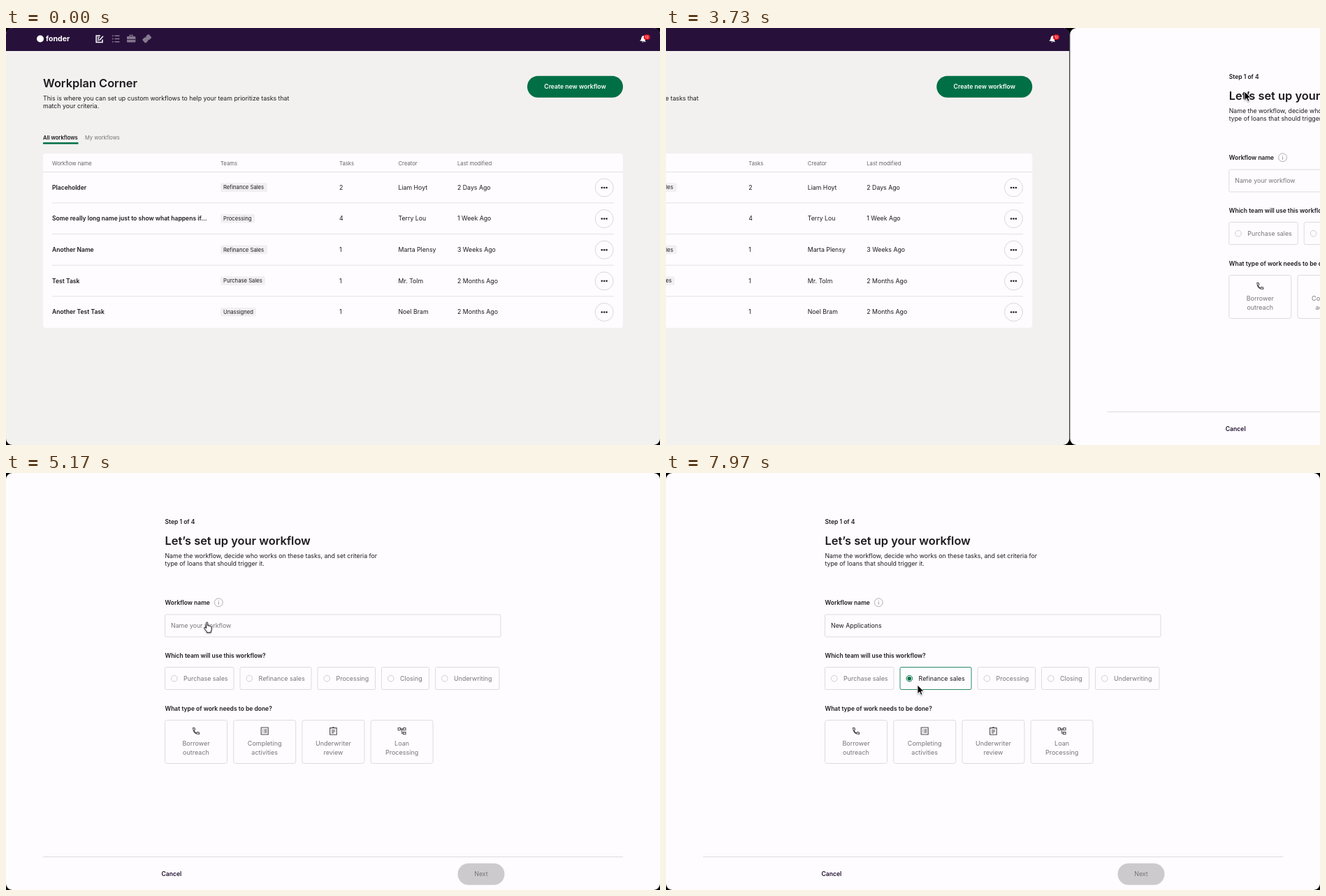
These frames come from a looping animation (936 px wide and 598 px high, 8 s). An HTML page:

```html
<!DOCTYPE html>
<html lang="en">
<head>
<meta charset="utf-8">
<title>Workflow setup</title>
<style>
html, body { margin: 0; width: 100%; height: 100%; overflow: hidden; background: #000; }
svg { display: block; font-family: Inter, "Open Sans", sans-serif; }
</style>
</head>
<body>
<svg id="stage" width="936" height="598" viewBox="0 0 936 598"></svg>
<script>
const INK = '#1c1a1f', GREY = '#757477', LINE = '#dcdbde', GREEN = '#006f46', PAPER = '#fefcff';

// y is the middle of the capital letters
const text = (x, y, s, size = 8.75, weight = 400, fill = INK, anchor = 'start', extra = '') =>
  `<text x="${x}" y="${y + size * 0.364}" font-size="${size}" font-weight="${weight}" fill="${fill}" text-anchor="${anchor}" ${extra}>${s}</text>`;
const rect = (x, y, w, h, r, fill, stroke = 'none', extra = '') =>
  `<rect x="${x}" y="${y}" width="${w}" height="${h}" rx="${r}" fill="${fill}" stroke="${stroke}" ${extra}/>`;
const circle = (x, y, r, fill, stroke = 'none', extra = '') =>
  `<circle cx="${x}" cy="${y}" r="${r}" fill="${fill}" stroke="${stroke}" ${extra}/>`;
const hline = (x1, x2, y, stroke = LINE) => `<path d="M${x1} ${y}H${x2}" stroke="${stroke}"/>`;
const icon = (cx, cy, d, color, width = 1.1) =>
  `<path transform="translate(${cx - 6} ${cy - 6})" d="${d}" fill="none" stroke="${color}" stroke-width="${width}"/>`;

function navBar() {
  const dim = '#85788f';
  return '<path d="M0 33V9Q0 0 9 0H927Q936 0 936 9V33Z" fill="#27113b"/>' +
    circle(49, 15.5, 5, '#fff') + text(57, 15.5, 'fonder', 10.6, 700, '#fff') +
    icon(134, 15.5, 'M7 1.5H1.2V11H10V7M3 4H6M3 6.3H5M3 8.6H4.5M5.5 8.3L11 2.2', '#fff', 1.5) +
    icon(157, 15.5, 'M1 1.8H2.8M1 6H2.8M1 10.2H2.8M4.5 1.8H11.5M4.5 6H11.5M4.5 10.2H11.5', dim, 1.5) +
    rect(173, 12, 12.4, 8.6, 1, dim) + icon(179.2, 15.5, 'M4 2.5V.9H8V2.5', dim, 1.2) + hline(173, 185.4, 16.6, '#27113b') +
    `<g transform="rotate(-42 201.7 15.3)">${rect(195.6, 11.8, 12.2, 7, 1, dim)}${circle(201.7, 11.8, 1, '#27113b')}${circle(201.7, 18.8, 1, '#27113b')}</g>` +
    '<path transform="rotate(12 912 16)" d="M907.5 19.2L909 17.5V14.5Q909 11 912 11T915 14.5V17.5L916.5 19.2ZM910.8 20H913.2Q912 21.8 910.8 20Z" fill="#fff"/>' +
    rect(912.6, 9.2, 9.2, 7.8, 3.9, '#e3121f') + text(917.2, 13.1, '12', 5, 500, '#fff', 'middle');
}

function tableRow([name, team, tagWidth, tasks, who, when], i) {
  const y = 228.6 + 44.65 * i;
  return text(66, y, name, 8.55, 600) +
    rect(307, y - 6.3, tagWidth, 12.6, 2, '#f1eff1') + text(311, y, team, 7.7) +
    text(477, y, tasks) + text(561.5, y, who) + text(646, y, when) +
    circle(856.2, y + 0.3, 13, PAPER, '#d9d7dc') +
    [-3.4, 0, 3.4].map(d => circle(856.2 + d, y + 0.3, 1.25, INK)).join('') +
    (i < 4 ? hline(66, 870, y + 22.3, '#e3e1e5') : '');
}

const rows = [
  ['Placeholder', 'Refinance Sales', 67, 2, 'Liam Hoyt', '2 Days Ago'],
  ['Some really long name just to show what happens if...', 'Processing', 49, 4, 'Terry Lou', '1 Week Ago'],
  ['Another Name', 'Refinance Sales', 67, 1, 'Marta Plensy', '3 Weeks Ago'],
  ['Test Task', 'Purchase Sales', 64, 1, 'Mr. Tolm', '2 Months Ago'],
  ['Another Test Task', 'Unassigned', 51, 1, 'Noel Bram', '2 Months Ago']
];
const heads = [[66, 'Workflow name'], [307, 'Teams'], [477, 'Tasks'], [561.5, 'Creator'], [646, 'Last modified']];

const listPage = rect(0, 0, 936, 598, 9, '#f2f1ef') + navBar() +
  text(53, 79, 'Workplan Corner', 16.4, 600) +
  text(53, 100.7, 'This is where you can set up custom workflows to help your team prioritize tasks that') +
  text(53, 112, 'match your criteria.') +
  rect(746, 68.8, 137, 31, 15.5, GREEN) + text(814.5, 84.2, 'Create new workflow', 8.65, 600, '#fff', 'middle') +
  text(53, 157.5, 'All workflows', 7.6, 600) + text(113, 157.5, 'My workflows', 7.5, 400, GREY) +
  rect(53, 164, 50.5, 2.4, 0.5, GREEN) +
  rect(53, 180, 830, 250, 4, PAPER) + hline(53, 883, 206.5, '#e3e1e5') +
  heads.map(([x, s]) => text(x, 193.8, s, 7.7, 400, '#656368')).join('') +
  rows.map(tableRow).join('');

const chips = [[227.5, 98.5, 'Purchase sales'], [335, 102, 'Refinance sales'], [446, 82.5, 'Processing'],
  [537.5, 68, 'Closing'], [614.5, 91.5, 'Underwriting']];
const chip = ([x, w, label], i) => `<g id="chip${i}">` + rect(x, 278.5, w, 32, 2, PAPER, LINE) +
  circle(x + 13.3, 294.7, 4.3, PAPER, '#cfcdd2') + circle(x + 13.3, 294.7, 2.8, 'none') +
  text(x + 26.6, 294.5, label, 8.9, 400, GREY) + '</g>';

const kinds = [
  ['Borrower', 'outreach', 'M1.5 1.5h2.4l.7 2.6-1.5 1.3q1.2 2.4 3.5 3.5l1.3-1.5 2.6.7v2.4Q2 10.5 1.5 1.5z'],
  ['Completing', 'activities', 'M1 1H11V11H1ZM3 4H4M5.2 4H9.2M3 6H4M5.2 6H9.2M3 8H4M5.2 8H9.2'],
  ['Underwriter', 'review', 'M1.2 1.6H10.8V11.2H1.2ZM4.5 1.5Q6-.3 7.5 1.5M3.5 4.8H8.5M3.5 6.8H8.5M3.5 8.8H7'],
  ['Loan', 'Processing', 'M.6 1.5H4V4.7H.6ZM8 1.5H11.4V4.7H8ZM8 7.6H11.4V10.8H8ZM4 3.1H8M6 3.1V9.2H8']
];
const kind = ([a, b, d], i) => {
  const x = 227.5 + 98.2 * i, mid = x + 44.5;
  return rect(x, 354.5, 89, 62, 3, PAPER, LINE) + icon(mid, 370, d, '#4d4b50') +
    text(mid, 387.5, a, 9, 400, GREY, 'middle') + text(mid, 401, b, 9, 400, GREY, 'middle');
};

const formPage = rect(0, 0, 936, 598, 9, PAPER) +
  text(227.5, 69.7, 'Step 1 of 4', 8.5, 600) +
  text(227.5, 97.2, 'Let’s set up your workflow', 16.4, 600) +
  text(227.5, 118.7, 'Name the workflow, decide who works on these tasks, and set criteria for') +
  text(227.5, 130, 'type of loans that should trigger it.') +
  text(227.5, 185.7, 'Workflow name', 8.5, 600) + circle(304.3, 185.7, 5.9, 'none', '#b0aeb3') +
  circle(304.3, 183, 0.6, '#98969b') + '<path d="M304.3 184.7V188.7" stroke="#98969b"/>' +
  rect(227.5, 203, 480.5, 32, 2, PAPER, LINE) + text(236, 218.7, '', 8.8, 400, GREY, 'start', 'id="entry"') +
  text(227.5, 261.5, 'Which team will use this workflow?', 8.5, 600) + chips.map(chip).join('') +
  text(227.5, 337.5, 'What type of work needs to be done?', 8.5, 600) + kinds.map(kind).join('') +
  hline(53, 883, 550.5) + text(222.5, 575, 'Cancel', 8.6, 600, '#21102f') +
  rect(646.5, 559.8, 67, 31, 15.5, '#cccacd') + text(680, 575, 'Next', 8.8, 400, GREY, 'middle');

const pointer = '<g id="pointer" stroke="#fff" stroke-width=".9" stroke-linejoin="round" style="filter:drop-shadow(0 1px 1px #0005)">' +
  '<path id="arrow" d="M0 0V12.6L2.9 9.9 4.9 14.4 7 13.5 5.1 9.1H9Z" fill="#000"/>' +
  '<path id="hand" d="M-1.4 8.8V1.2Q-1.4 0 -.4 0T.7 1.2V5Q2 4.4 2.7 5.4 4 4.9 4.6 6 6.2 5.6 6.2 7.2V10.5Q6 12.3 5.2 13V14.8H-.6V13.4Q-2.6 11.2 -4.4 8.4-4.7 7-3.2 7.2Z" fill="#fff" stroke="#000"/></g>';

const $ = id => document.getElementById(id);
$('stage').innerHTML = `<g id="list">${listPage}</g><g id="form">${formPage}</g>${pointer}`;

// [time, x, y]
const path = [
  [1340, 941, 264], [1530, 871, 167], [1690, 871, 167], [1770, 832, 104], [1880, 826, 91], [3393, 826, 91],
  [3600, 828, 91], [4193, 828, 91], [4290, 821, 93], [4325, 821, 93], [4600, 421, 163], [4840, 421, 163],
  [5170, 288, 214], [6500, 288, 214], [7030, 360, 251], [7400, 420, 290], [7830, 420, 290], [7970, 360, 304]
];
const handTimes = [[1790, 3393], [5015, 5530], [7195, 7500]];
const typing = [[5530, ''], [5600, 'N'], [5700, 'Ne'], [5770, 'New'], [5870, 'New A'], [6030, 'New Applic'], [6200, 'New Applications']];
const PICK = 7500, SLIDE = 3394, SLIDE_TIME = 800, STEP = 937;

const clamp = u => Math.max(0, Math.min(1, u));
function position(t) {
  const next = path.findIndex(p => p[0] > t);
  if (next < 1) return (next ? path[path.length - 1] : path[0]).slice(1);
  const [t0, x0, y0] = path[next - 1], [t1, x1, y1] = path[next];
  const u = (t - t0) / (t1 - t0), e = u * (2 - u);
  return [x0 + (x1 - x0) * e, y0 + (y1 - y0) * e];
}

const [box, ring, dot, label] = $('chip1').children;
function draw(t) {
  const u = clamp((t - SLIDE) / SLIDE_TIME), shift = STEP * u * u * (3 - 2 * u);
  $('list').setAttribute('transform', `translate(${-shift} 0)`);
  $('form').setAttribute('transform', `translate(${STEP - shift} 0)`);

  const typed = typing.filter(([at]) => at <= t).pop();
  $('entry').textContent = typed ? typed[1] : 'Name your workflow';
  $('entry').setAttribute('fill', typed ? INK : GREY);

  const picked = t >= PICK;
  box.setAttribute('stroke', picked ? '#2c8a64' : LINE);
  ring.setAttribute('stroke', picked ? GREEN : '#cfcdd2');
  dot.setAttribute('fill', picked ? GREEN : 'none');
  label.setAttribute('fill', picked ? INK : GREY);

  const hand = handTimes.some(([a, b]) => t >= a && t < b);
  $('hand').style.display = hand ? '' : 'none';
  $('arrow').style.display = hand ? 'none' : '';
  $('pointer').style.display = t < path[0][0] ? 'none' : '';
  $('pointer').setAttribute('transform', `translate(${position(t)})`);
}

function tick() {
  draw(performance.now() % 8000);
  requestAnimationFrame(tick);
}
tick();
</script>
</body>
</html>
```
